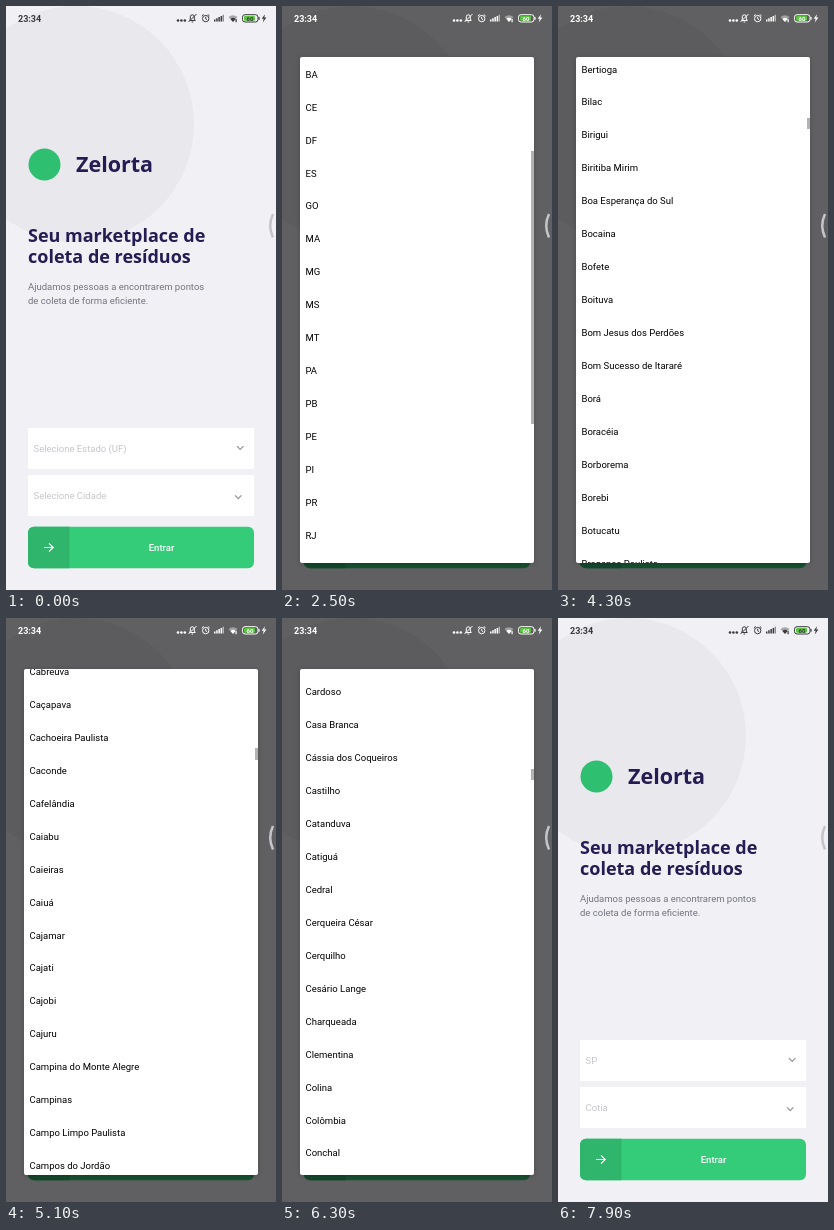
An HTML page for the animation above (8000 ms loop, 270x584 px).

```html
<!DOCTYPE html>
<html lang="pt-BR">
<head>
<meta charset="utf-8">
<title>Coleta de resíduos</title>
<style>
  html, body { margin: 0; width: 100%; height: 100%; overflow: hidden; background: #f0f0f5; }
  #stage { position: relative; width: 270px; height: 584px; overflow: hidden; background: #f0f0f5;
    font: 9.5px Roboto, sans-serif; }
  svg, #dim { position: absolute; left: 0; top: 0; width: 270px; height: 584px; }
  #dim { background: #000; }
  .title { font: 700 18px "Open Sans", sans-serif; fill: #261c53; }
  .brand { font-size: 21.5px; }
  .sub { fill: #74747f; }
  .value { fill: #c5c5cc; }
  #dialog { position: absolute; left: 18px; width: 234px; overflow: hidden; background: #fff;
    border-radius: 2px; }
  #shadow { position: absolute; left: 18px; width: 234px; border-radius: 2px;
    box-shadow: 0 1px 5px rgba(0, 0, 0, .2); }
  #dialog ul { margin: 0; padding: 1px 0 0 5.5px; list-style: none; }
  #dialog li { height: 32.95px; line-height: 33px; color: #000; white-space: nowrap; }
  #thumb { position: absolute; right: 0; width: 3px; background: #b2b2b2; }
</style>
</head>
<body>
<div id="stage">
  <svg viewBox="0 0 270 584">
    <circle cx="70" cy="118" r="118" fill="#e8e8ed"/>
    <circle cx="38.5" cy="158.5" r="16" fill="#2fbf71"/>
    <text class="title brand" x="70" y="166">Zelorta</text>
    <text class="title" x="22" y="236">Seu marketplace de</text>
    <text class="title" x="22" y="257">coleta de resíduos</text>
    <text class="sub" x="22" y="283.5">Ajudamos pessoas a encontrarem pontos</text>
    <text class="sub" x="22" y="297.5">de coleta de forma eficiente.</text>
    <path d="M22 422h226v41H22zM22 469h226v41H22z" fill="#fff"/>
    <text class="value" id="state" x="27.5" y="446"></text>
    <text class="value" id="city" x="27.5" y="493"></text>
    <path d="M231 440.2l3.2 3.2 3.2-3.2M229 489.4l3.2 3.2 3.2-3.2" fill="none" stroke="#929297" stroke-width="1.2"/>
    <rect x="22" y="520.7" width="226" height="41.5" rx="6" fill="#34cb79"/>
    <path d="M63.5 520.7H28a6 6 0 0 0-6 6v29.5a6 6 0 0 0 6 6h35.5z" fill="#2fb56c"/>
    <path d="M38 541.5h9M43 537.3l4.2 4.2-4.2 4.2" fill="none" stroke="#fff" stroke-width="1.2"/>
    <text x="155.5" y="545" text-anchor="middle" font-weight="500" fill="#fff">Entrar</text>
  </svg>

  <div id="dim"></div>
  <div id="shadow"></div>
  <div id="dialog"><ul></ul><div id="thumb"></div></div>

  <svg id="status" viewBox="0 0 270 584">
    <g fill="currentColor">
      <text x="12" y="15.5" font-size="9" font-weight="700">23:34</text>
      <circle cx="172" cy="14.5" r="1.3"/>
      <circle cx="175.4" cy="14.5" r="1.3"/>
      <circle cx="178.8" cy="14.5" r="1.3"/>
      <path d="M208 15.5v-2h1.5v2zM210.2 15.5v-3.2h1.5v3.2zM212.4 15.5v-4.4h1.5v4.4zM214.6 15.5v-5.6h1.5v5.6z"/>
      <path d="M216.6 15.5V8.7h1.3v6.8z" opacity=".6"/>
      <path d="M222.5 11a6.5 6.5 0 0 1 9 0l-4.5 5z" opacity=".4"/>
      <path d="M224.5 13a3.6 3.6 0 0 1 5 0l-2.5 3z"/>
      <path d="M229.5 13h1.2v3.2h-1.2z"/>
      <path d="M259 8.3l-3.3 4.5h2l-.9 3.7 3.6-4.9h-2.1z"/>
    </g>
    <g fill="none" stroke="currentColor">
      <path d="M183.8 14.5h5.5l-1-1.5v-2.2a2 2 0 0 0-4 0V13zM185.6 16h1.6M182.5 16l8-8"/>
      <circle cx="199.7" cy="12.6" r="3.2"/>
      <path d="M199.7 10.8v2l1.3.8M195.8 10l1.8-1.6M203.6 10l-1.8-1.6"/>
      <rect x="236.5" y="8.7" width="15.5" height="7.3" rx="2.5"/>
    </g>
    <path d="M253 11v2.8" stroke="currentColor" stroke-width="1.2"/>
    <rect x="238" y="10" width="11" height="4.7" rx="1.2" fill="#58c63c"/>
    <text x="244" y="14.5" font-size="6" font-weight="700" text-anchor="middle" fill="currentColor">60</text>
    <path d="M267 208q-5.500 11.500 0 23.500" fill="none" stroke="#c4c4ca" stroke-width="2.500"/>
  </svg>
</div>

<script>
const LOOP = 8000, ROW = 32.95, DIM = 0.6;

const states = 'Selecione Estado (UF)|AC|AL|AM|AP|BA|CE|DF|ES|GO|MA|MG|MS|MT|PA|PB|PE|PI|PR|RJ|RN|RO|RR|RS|SC|SE|SP|TO'.split('|');
const cities = ('Selecione Cidade|Adamantina|Adolfo|Aguaí|Águas da Prata|Águas de Lindóia|Águas de Santa Bárbara|' +
  'Águas de São Pedro|Agudos|Alambari|Alfredo Marcondes|Altair|Altinópolis|Alto Alegre|Alumínio|Álvares Florence|' +
  'Álvares Machado|Álvaro de Carvalho|Alvinlândia|Americana|Américo Brasiliense|Américo de Campos|Amparo|Analândia|' +
  'Andradina|Angatuba|Anhembi|Anhumas|Aparecida|Aparecida d\'Oeste|Apiaí|Araçariguama|Araçatuba|Araçoiaba da Serra|' +
  'Aramina|Arandu|Arapeí|Araraquara|Araras|Arco-Íris|Arealva|Areias|Areiópolis|Ariranha|Artur Nogueira|Arujá|' +
  'Aspásia|Assis|Atibaia|Auriflama|Avaí|Avanhandava|Avaré|Bady Bassitt|Balbinos|Bálsamo|Bananal|Barão de Antonina|' +
  'Barbosa|Bariri|Barra Bonita|Barra do Chapéu|Barra do Turvo|Barretos|Barrinha|Barueri|Bastos|Batatais|Bauru|' +
  'Bebedouro|Bento de Abreu|Bernardino de Campos|Bertioga|Bilac|Birigui|Biritiba Mirim|Boa Esperança do Sul|' +
  'Bocaina|Bofete|Boituva|Bom Jesus dos Perdões|Bom Sucesso de Itararé|Borá|Boracéia|Borborema|Borebi|Botucatu|' +
  'Bragança Paulista|Braúna|Brejo Alegre|Brodowski|Brotas|Buri|Buritama|Buritizal|Cabrália Paulista|Cabreúva|' +
  'Caçapava|Cachoeira Paulista|Caconde|Cafelândia|Caiabu|Caieiras|Caiuá|Cajamar|Cajati|Cajobi|Cajuru|' +
  'Campina do Monte Alegre|Campinas|Campo Limpo Paulista|Campos do Jordão|Campos Novos Paulista|Cananéia|Canas|' +
  'Cândido Mota|Cândido Rodrigues|Canitar|Capão Bonito|Capela do Alto|Capivari|Caraguatatuba|Carapicuíba|Cardoso|' +
  'Casa Branca|Cássia dos Coqueiros|Castilho|Catanduva|Catiguá|Cedral|Cerqueira César|Cerquilho|Cesário Lange|' +
  'Charqueada|Clementina|Colina|Colômbia|Conchal|Conchas|Cordeirópolis|Coroados|Coronel Macedo|Corumbataí|' +
  'Cosmópolis|Cosmorama|Cotia|Cravinhos|Cristais Paulista|Cruzália|Cruzeiro|Cubatão|Cunha|Descalvado').split('|');

// Scroll keys are [time, offset] pairs; count is the full length of the list.
const pickers = [
  { items: states, count: 28, open: 2080, close: 2860,
    keys: [[2270, 0], [2500, 164], [2700, 417]] },
  { items: cities, count: 646, open: 3360, close: 7020,
    keys: [[3700, 0], [3900, 640], [4300, 2375], [4700, 2860], [5100, 3176], [5500, 3560],
           [5920, 3710], [6030, 3710], [6300, 4044.5], [6600, 4340], [6900, 4430]] }
];

const $ = s => document.querySelector(s);
const list = $('#dialog ul'), dialog = $('#dialog'), shadow = $('#shadow'), thumb = $('#thumb');
const clamp = x => Math.max(0, Math.min(1, x));
let shown = null;

// Monotone cubic through the keys: flings ease without overshooting.
function curve(keys, t) {
  const last = keys.length - 1;
  if (t <= keys[0][0]) return keys[0][1];
  if (t >= keys[last][0]) return keys[last][1];
  const rate = i => (keys[i + 1][1] - keys[i][1]) / (keys[i + 1][0] - keys[i][0]);
  const slope = i => {
    if (i === 0 || i === last) return 0;
    const a = rate(i - 1), b = rate(i);
    return a * b > 0 ? 2 * a * b / (a + b) : 0;
  };
  let i = 0;
  while (keys[i + 1][0] < t) i++;
  const [t0, v0] = keys[i], [t1, v1] = keys[i + 1];
  const h = t1 - t0, u = (t - t0) / h, w = 1 - u;
  return v0 * (1 + 2 * u) * w * w + slope(i) * h * u * w * w +
    v1 * u * u * (3 - 2 * u) - slope(i + 1) * h * u * u * w;
}

function fill(picker) {
  shown = picker;
  list.replaceChildren(...picker.items.map(name => {
    const li = document.createElement('li');
    li.textContent = name;
    return li;
  }));
}

function drawPicker(picker, t) {
  const rise = clamp((t - picker.open) / 140);
  const fall = 1 - clamp((t - picker.close) / 100);
  const top = rise < 0.5 ? 35 : 51;
  const height = rise < 0.5 ? 538 : 505.5;
  if (shown !== picker) fill(picker);
  for (const el of [dialog, shadow]) {
    el.style.top = top + 'px';
    el.style.height = height + 'px';
    el.style.opacity = clamp(rise * 4) * fall;
  }
  const scroll = curve(picker.keys, t);
  const total = picker.count * ROW, track = height - 8;
  list.style.transform = `translateY(${-scroll}px)`;
  thumb.style.top = 5 + track * scroll / total + 'px';
  thumb.style.height = track * height / total + 'px';
  return DIM * rise * rise * fall;
}

function draw(t) {
  const active = pickers.find(p => t >= p.open && t < p.close + 100);
  const dim = active ? drawPicker(active, t) : 0;
  dialog.style.visibility = shadow.style.visibility = active ? 'visible' : 'hidden';
  $('#dim').style.opacity = dim;
  $('#status').style.color = dim > DIM / 2 ? '#fff' : '#3a3a3e';
  $('#state').textContent = t < pickers[0].close ? states[0] : 'SP';
  $('#city').textContent = t < pickers[1].close ? cities[0] : 'Cotia';
}

const start = performance.now();
function tick() {
  draw((performance.now() - start) % LOOP);
  requestAnimationFrame(tick);
}
tick();
</script>
</body>
</html>
```
